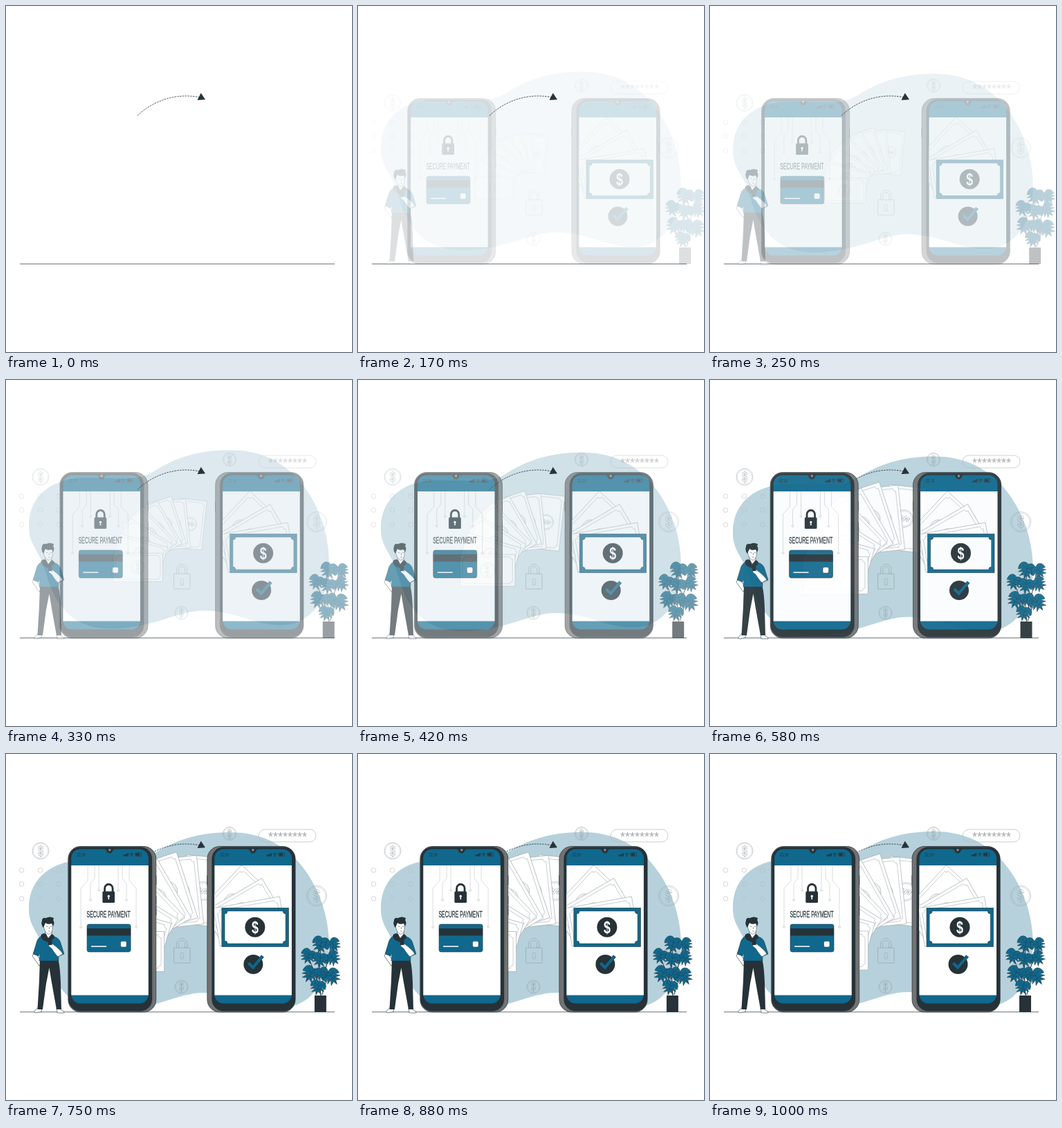
An HTML page for the animation above (1040 ms loop, 500 by 500 pixels).

```html
<!DOCTYPE html>
<html lang="en">
<head>
<meta charset="utf-8">
<title>Secure payment</title>
<style>
html, body { margin: 0; width: 100%; height: 100%; overflow: hidden; background: #fff; }
svg { display: block; width: 100%; height: 100%; }
text { font-family: "Liberation Sans", Arial, sans-serif; text-anchor: middle; }
</style>
</head>
<body>
<svg id="stage" viewBox="0 0 500 500"></svg>
<script>
const DARK = '#263238', BLUE = '#10688d', PALE = '#b6d1dc', GREY = '#9aa3a7';
const LOOP = 1040, FRAME = 1000 / 24, SLIDE = 20;
const stage = document.getElementById('stage');

const rect = (x, y, w, h, r, attrs) =>
  `<rect x="${x}" y="${y}" width="${w}" height="${h}" rx="${r}" ${attrs}/>`;
const circle = (x, y, r, attrs) => `<circle cx="${x}" cy="${y}" r="${r}" ${attrs}/>`;
const path = (d, attrs) => `<path d="${d}" ${attrs}/>`;
const group = (id, content) => `<g id="${id}">${content}</g>`;
const line = (color, width) => `fill="none" stroke="${color}" stroke-width="${width}"`;
const fill = color => `fill="${color}"`;
const inked = (color, width = 0.6) => `fill="${color}" stroke="${DARK}" stroke-width="${width}"`;

// Condensed lettering
const narrow = (x, y, size, squeeze, text, attrs) =>
  `<text transform="translate(${x} ${y}) scale(${squeeze} 1)" font-size="${size}" ${attrs}>${text}</text>`;

const coin = (x, y, r) => circle(x, y, r, line(GREY, 0.6)) + circle(x, y, r * 0.86, line(GREY, 0.3)) +
  narrow(x, y + r * 0.58, r * 1.65, 0.75, '$', `font-weight="700" ${line(GREY, 0.6)}`);

const noteEdge = (w, h) => {
  const c = 4;
  return `M${-w + c} ${-h}H${w - c}A${c} ${c} 0 0 0 ${w} ${-h + c}V${h - c}A${c} ${c} 0 0 0 ${w - c} ${h}` +
    `H${-w + c}A${c} ${c} 0 0 0 ${-w} ${h - c}V${-h + c}A${c} ${c} 0 0 0 ${-w + c} ${-h}Z`;
};

const bill = ([x, y, angle]) => `<g transform="translate(${x} ${y}) rotate(${angle})">
  ${rect(-48.5, -28, 97, 56, 0, `fill="#fff" stroke="${GREY}" stroke-width=".6"`)}
  ${path(noteEdge(44, 23.5), line(GREY, 0.5))}${coin(0, 0, 13)}</g>`;

function backdrop() {
  let dots = '';
  for (const x of [22.5, 49.5, 76]) for (const y of [168, 188, 209]) dots += circle(x, y, 3.3, line('#bbb', 0.6));
  return dots + coin(50, 140, 12) + coin(323, 115, 9.5) + coin(449, 205, 14.5) + coin(253.5, 336.5, 9.5) +
    rect(365, 109, 83, 18, 9, line('#b5b8ba', 0.7)) +
    `<text x="407" y="126" font-size="18" ${fill('#a3a8aa')}>********</text>` +
    rect(242.5, 280, 23.5, 22, 1, line(GREY, 0.7)) +
    path('M246.5 280V274A7.7 7.7 0 0 1 262 274V280H258.800V274A4.500 4.500 0 0 0 249.700 274V280', line(GREY, 0.6)) +
    path('M252.700 291.500A2.500 2.500 0 1 1 255.700 291.500L256.500 296H252Z', line(GREY, 0.6));
}

// depth: +1 shows the phone's right side, -1 its left side
function phone(x, depth, content) {
  const left = depth > 0 ? x : x - 6, mid = x + 60, edge = depth > 0 ? x + 122.5 : x - 6.5;
  const sx = x + 4.5;
  const button = (y, h) => rect(edge, y, 5, h, 1, fill(DARK));
  const bars = [2, 3, 4, 5].map((h, i) => rect(mid + 19.5 + i * 2, 148 - h, 1.4, h, 0, fill(DARK))).join('');
  return button(175, 15) + (depth > 0 ? button(205, 13) + button(219, 15) : '') +
    rect(left, 133.5, 127, 239.5, 18, inked('#707273', 0.7)) +
    rect(x + 0.7, 134.5, 120.5, 237, 17, inked(DARK, 0.4)) +
    rect(sx, 137.5, 111.5, 223, 13, fill(BLUE)) +
    rect(sx, 161, 111.5, 187.5, 0, fill('#fff')) +
    path(`M${mid - 8} 137C${mid - 4} 137 ${mid - 5} 143.500 ${mid} 143.500S${mid + 4} 137 ${mid + 8} 137Z`, fill(DARK)) +
    circle(mid, 138.7, 1.7, fill('#8b8f91')) +
    narrow(x + 18.5, 148.2, 7, 0.7, '22:16', fill(DARK)) + bars +
    path(`M${mid + 28.500} 144.500q3-2.500 6 0M${mid + 29.700} 146q1.800-1.500 3.600 0`, line(DARK, 0.9)) +
    circle(mid + 31.500, 147.5, 0.8, fill(DARK)) +
    rect(mid + 37, 142.7, 8.5, 5, 1, line(DARK, 0.7)) + rect(mid + 38, 143.6, 5, 3.2, 0, fill(DARK)) +
    content;
}

function paymentScreen() {
  const half = 'M-14 161V195M-20 161V180L-26 187V209M-30 161V183L-40 194V248';
  const ends = [[-14, 197], [-26, 211], [-40, 250]].map(([x, y]) => circle(x, y, 1.4, line('#b4b9bc', 0.6))).join('');
  const wires = path(half, line('#c3c7c9', 0.6)) + ends;
  return `<g transform="translate(147 0)">${wires}</g><g transform="translate(147 0) scale(-1 1)">${wires}</g>` +
    path('M141.500 200V194A5.700 5.700 0 0 1 153 194V200', line(DARK, 2.8)) +
    rect(138.3, 198.5, 17.7, 16.5, 1.5, fill(DARK)) +
    circle(147.2, 205.5, 1.7, fill('#fff')) + path('M146.700 206H147.700L148.200 210H146.200Z', fill('#fff')) +
    narrow(147, 236, 12.6, 0.55, 'SECURE PAYMENT', `fill="${DARK}" stroke="${DARK}" stroke-width=".25"`) +
    rect(116, 246, 63, 40, 3, inked(BLUE)) + rect(116, 252, 63, 10.5, 0, fill(DARK)) +
    rect(122, 277.3, 22, 1.5, 0, fill('#fff')) + rect(164.5, 270.5, 8.5, 8.5, 2, inked('#fff', 0.5));
}

function receiptScreen() {
  const notes = [[329, 215, -47], [343, 228, -30], [353.5, 242, -10]].map(bill).join('');
  return `<clipPath id="glass">${rect(302.5, 161, 111.5, 187.5, 0, '')}</clipPath>
    <g clip-path="url(#glass)">${notes}</g>` +
    rect(313, 222.5, 96.5, 56, 0, inked(BLUE)) +
    `<g transform="translate(361.200 250.500)">${path(noteEdge(44, 23.5), inked('#fff', 0.5))}</g>` +
    circle(361, 250.3, 14.5, fill(DARK)) + narrow(361, 258.5, 23, 0.78, '$', 'font-weight="700" fill="#fff"') +
    circle(358.5, 304, 14, fill(DARK)) +
    path('M351.500 302L358 308.500L372 292', line(DARK, 5)) + path('M351.500 302L358 308.500L372 292', line(BLUE, 4));
}

function plant() {
  const shape = 'M0-9C8-15 14-6 12 1L6-1 11 5 4 3 8 10 2 7 0 13-2 7-8 10-4 3-11 5-6-1-12 1C-14-6-8-15 0-9Z';
  const leaves = [[456, 275, 15, 1], [474, 276, -35, 0.85], [438, 292, 25, 0.9], [473, 295, -45, 0.9],
    [455, 297, 10, 0.9], [441, 318, 30, 1], [472, 322, -35, 1], [457, 317, -10, 0.8], [452, 337, 15, 0.9]];
  return path('M456 350C454 325 453 305 457 275M457 340Q461 310 474 277M456 345Q447 315 438 293M458 348Q462 325 473 322', line(DARK, 1)) +
    leaves.map(([x, y, a, s]) => `<g transform="translate(${x} ${y}) rotate(${a}) scale(${s})">` +
      path(shape, inked(BLUE, 0.5)) + path('M0-8V11M0-2L7-6M0-2L-7-6M0 3L5 2M0 3L-5 2', line(DARK, 0.4)) + '</g>').join('') +
    rect(447, 349, 17, 24, 0, fill(DARK));
}

function man() {
  return path('M46 366L41 372Q40 374 43 374L51 372.500L52 366ZM73 367L74 374H84Q85 372 80 370L79 366Z', inked('#fff')) +
    path('M42 287Q38 290 38 292L48 306 52 301 45 291Z', inked('#fff')) +
    path('M49 296H75Q78 305 79 330L80 369H73L66 330 62.500 309 58 332 53 369H45.500L48 328Z', fill(DARK)) +
    path('M51 263Q45 266 43 276L39 289 47 292 49 288 48 299H76V289L75 293 84 289 79 273Q77 266 70 264L61 266Z', inked(BLUE, 0.5)) +
    path('M57 256V264L61 268 66 264V256Z', inked('#fff', 0.5)) +
    path('M51 261Q54 258 58 260L61 266 66 260Q71 262 70 266L64 270 61 272 54 269Q49 265 51 261Z', fill(DARK)) +
    path('M54.500 244Q53.500 254 59 259Q62 262 65.500 258Q68 254 67.500 244L62 241Z', inked('#fff', 0.5)) +
    path('M54 251Q50 246 52 241Q52 236 58 237Q63 234 69 237Q69 239 68 240Q71 243 68 249L66 245Q60 247 57 244Z', fill(DARK)) +
    path('M58 249.500H60.500M64 249.500H66.500M62.500 250V253M61 256H64', line(DARK, 0.5)) +
    path('M75 293L82 289Q80 284 68 275L64 273Q61 274 62 278L66 281Q71 289 75 293Z', inked('#fff', 0.5)) +
    rect(61, 267, 5.5, 9, 0.8, fill(DARK)) + path('M62 276Q65 274 68 277', line(DARK, 0.4));
}

const BLOB = 'M33 222C33 175 70 152 115 152C175 152 192 157 215 142C252 119 285 112 325 112C400 112 440 165 457 215' +
  'C475 270 472 345 415 363C370 372 340 346 290 344C250 342 215 370 150 370C95 370 70 335 58 290C48 255 33 250 33 222Z';
const FAN = [[283, 199, 96], [251, 200, 84], [234, 199, 72], [218, 209, 60],
  [203, 219, 46], [192, 237, 32], [184, 258, 16], [180, 284, 0]];

stage.innerHTML =
  group('blob', path(BLOB, fill(PALE))) +
  group('backdrop', backdrop()) +
  path('M20 372.800H475', line(DARK, 0.7)) +
  group('money', FAN.map(bill).join('')) +
  path('M190 158.500C212 137 246 125 280 132', `${line(DARK, 0.8)} stroke-dasharray="2.500 1.300"`) +
  path('M281.700 125.700L276.500 136L288 135.300Z', fill(DARK)) +
  group('payer', phone(88.7, 1, paymentScreen())) +
  group('receiver', phone(298, -1, receiptScreen()) + plant()) +
  group('man', man());

const bezier = (a, b, s) => 3 * (1 - s) ** 2 * s * a + 3 * (1 - s) * s * s * b + s ** 3;

// cubic-bezier(.36, -.01, .5, 1.38): overshoots, then settles
function ease(x) {
  let low = 0, high = 1;
  for (let i = 0; i < 24; i++) {
    const s = (low + high) / 2;
    if (bezier(0.36, 0.5, s) < x) low = s; else high = s;
  }
  return bezier(-0.01, 1.38, high);
}

function pose(id, opacity, transform) {
  const node = document.getElementById(id);
  node.setAttribute('opacity', opacity);
  node.setAttribute('transform', transform);
}

function draw(ms) {
  const step = Math.floor((ms % LOOP + 5) / FRAME);
  const p = step < 2 ? 0 : ease(Math.min(1, (step + 1) / 24.5));
  const shown = Math.max(0, Math.min(1, p));
  const shift = SLIDE * (1 - p);
  pose('blob', shown, `translate(0 ${-shift})`);
  pose('payer', shown, `translate(${-shift} 0)`);
  pose('receiver', shown, `translate(${shift} 0)`);
  pose('money', shown, `translate(220 234) scale(${0.5 + p / 2}) translate(-220 -234)`);
  pose('backdrop', shown, '');
  pose('man', shown, '');
}

const start = performance.now();
function tick() {
  draw(performance.now() - start);
  requestAnimationFrame(tick);
}
tick();
</script>
</body>
</html>
```
